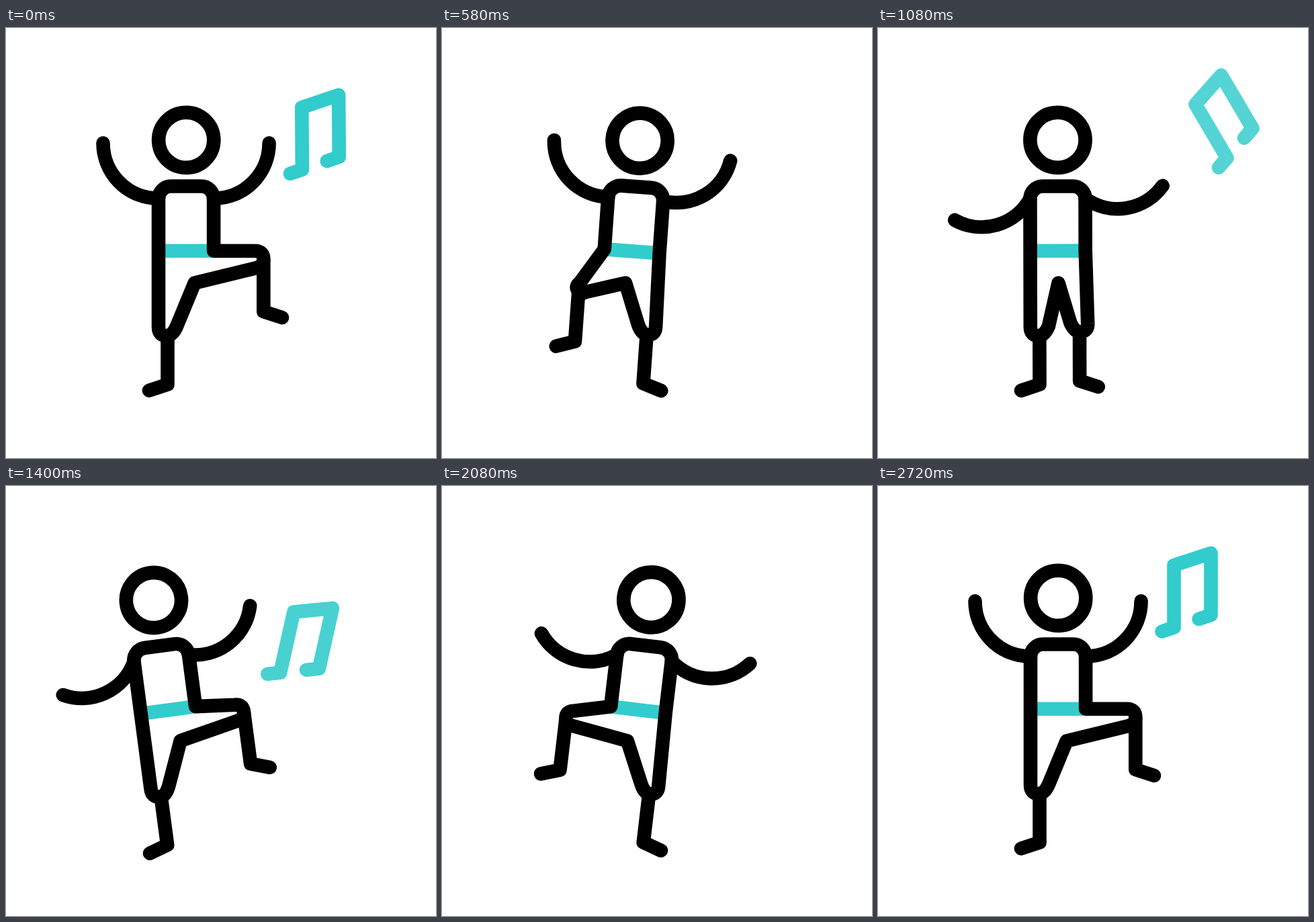
Recreate the animation shown at these times as an HTML page. Size 640 by 640 pixels, loop 3000 ms.

```html
<!DOCTYPE html>
<html lang="en">
<head>
<meta charset="utf-8">
<title>Dancer</title>
<style>
  html, body { margin: 0; width: 100%; height: 100%; overflow: hidden; background: #fff; }
  svg { display: block; width: 100%; height: 100%; }
  svg * { fill: none; stroke-width: 20.6; stroke-linecap: round; stroke-linejoin: round; }
  #dancer { stroke: #000; }
  #note { stroke: #32cccc; }
  #belt { stroke: #32cccc; stroke-linecap: butt; }
</style>
</head>
<body>
<svg viewBox="0 0 640 640">
  <path id="note" d="M422.5 216.5L440.5 210.5V118L495.5 100V192L477.5 198"/>
  <g id="dancer">
    <path id="belt" d="M227 331.7H309"/>
    <circle cx="268.2" cy="166.8" r="41.1"/>
    <path id="armL" d="M144.5 171.3A82.5 82.5 0 0 0 227 253.8"/>
    <path id="armR" d="M391.6 171.3A82.5 82.5 0 0 1 309.1 253.8"/>
    <path id="shinL"/>
    <path id="shinR"/>
    <path id="body"/>
  </g>
</svg>
<script>
const LOOP = 3000, END = 2720, MID = 268.2;
const $ = id => document.getElementById(id);
const set = (id, name, value) => $(id).setAttribute(name, value);
const clamp = u => Math.max(0, Math.min(1, u));
const sine = u => (1 - Math.cos(Math.PI * u)) / 2;
const mix = (a, b, u) => a + (b - a) * u;

// Eased step from 0 to 1, and a rise to 1 at top followed by a fall.
const ramp = (t, from, to) => sine(clamp((t - from) / (to - from)));
const hump = (t, from, top, to) => ramp(t, from, top) - ramp(t, top, to);

// The right leg, standing and raised; the left one is its mirror image.
const kneeDown = [[309.4, 445], [309.4, 458], [297.4, 458], [288.4, 458], [282.4, 444]];
const kneeUp = [[370, 331.7], [383.3, 331.7], [383.3, 344], [383.3, 354], [373, 357]];
const shinDown = [[295.9, 458], [295.9, 530.5], [323.4, 539.5]];
const shinUp = [[383.3, 345], [383.3, 422], [411, 431]];
const pose = (down, up, u) => down.map((p, i) => p.map((v, k) => mix(v, up[i][k], u)));
const mirror = pts => pts.map(([x, y]) => [2 * MID - x, y]);

function drawDancer(t) {
  const stepL = hump(t, 410, 735, 1055) + hump(t, 1650, 2010, 2335);
  const stepR = hump(t, 1055, 1385, 1650);
  const liftR = mix(.035, 1, 1 - ramp(t, 0, 400) + .96 * stepR + ramp(t, 2335, END));
  const swingL = ramp(t, 495, 1150) - ramp(t, 1430, 1880) + hump(t, 1880, 2246, END);
  const swingR = hump(t, 470, 895, 1305) + hump(t, 1270, 1687, 2650);

  const kneeR = pose(kneeDown, kneeUp, liftR);
  const kneeL = mirror(pose(kneeDown, kneeUp, stepL)).reverse();
  const round = ([a, b, c, d, e]) => `L${a}Q${b} ${c}Q${d} ${e}`;
  const crotch = MID + 12.5 * (liftR - stepL);
  set('body', 'd',
    'M227 331.7V254A18.5 18.5 0 0 1 245.5 235.5H290.6A18.5 18.5 0 0 1 309.1 254V331.7' +
    `${round(kneeR)}L${crotch} 379.5${round(kneeL)}Z`);
  set('shinR', 'd', 'M' + pose(shinDown, shinUp, liftR));
  set('shinL', 'd', 'M' + mirror(pose(shinDown, shinUp, stepL)));
  set('armL', 'transform', `rotate(${-62.5 * swingL} 227 253.8)`);
  set('armR', 'transform', `rotate(${62.5 * swingR} 309.1 253.8)`);
  set('dancer', 'transform', `rotate(${7.6 * (stepL - stepR)} ${MID} 535)`);
}

// The note flies between these places, turning as it goes.
const low = { x: 447, y: 245, turn: 0 };
const rest = { x: 463.5, y: 158.5, turn: 0 };
const right = { x: 520, y: 91, turn: -43 };
const left = { x: 391, y: 102, turn: 43 };
const flights = [
  { start: 0, end: 550, from: rest, to: right, bow: 0 },
  { start: 730, end: 1285, from: low, to: right, bow: 16 },
  { start: 1290, end: 1860, from: low, to: left, bow: 0 },
  { start: 2255, end: END, from: low, to: rest, bow: 0 }
];

function drawNote(t) {
  const f = flights.find(f => t >= f.start && t <= f.end);
  set('note', 'opacity', 0);
  if (!f) return;
  const { start, end, from, to, bow } = f;
  const u = (t - start) / (end - start);
  const x = mix(from.x, to.x, sine(u)) + bow * Math.sin(Math.PI * u);
  const y = mix(from.y, to.y, sine(u));
  const fadeIn = from === rest ? 1 : clamp((t - start) / 125);
  const fadeOut = to === rest ? 1 : clamp((end - t) / 245);
  set('note', 'opacity', fadeIn * fadeOut);
  set('note', 'transform',
    `translate(${x} ${y}) rotate(${to.turn * u ** .75}) translate(${-rest.x} ${-rest.y})`);
}

const begin = performance.now();
function tick() {
  const t = Math.min((performance.now() - begin) % LOOP, END);
  drawNote(t);
  drawDancer(t);
  requestAnimationFrame(tick);
}
tick();
</script>
</body>
</html>
```
